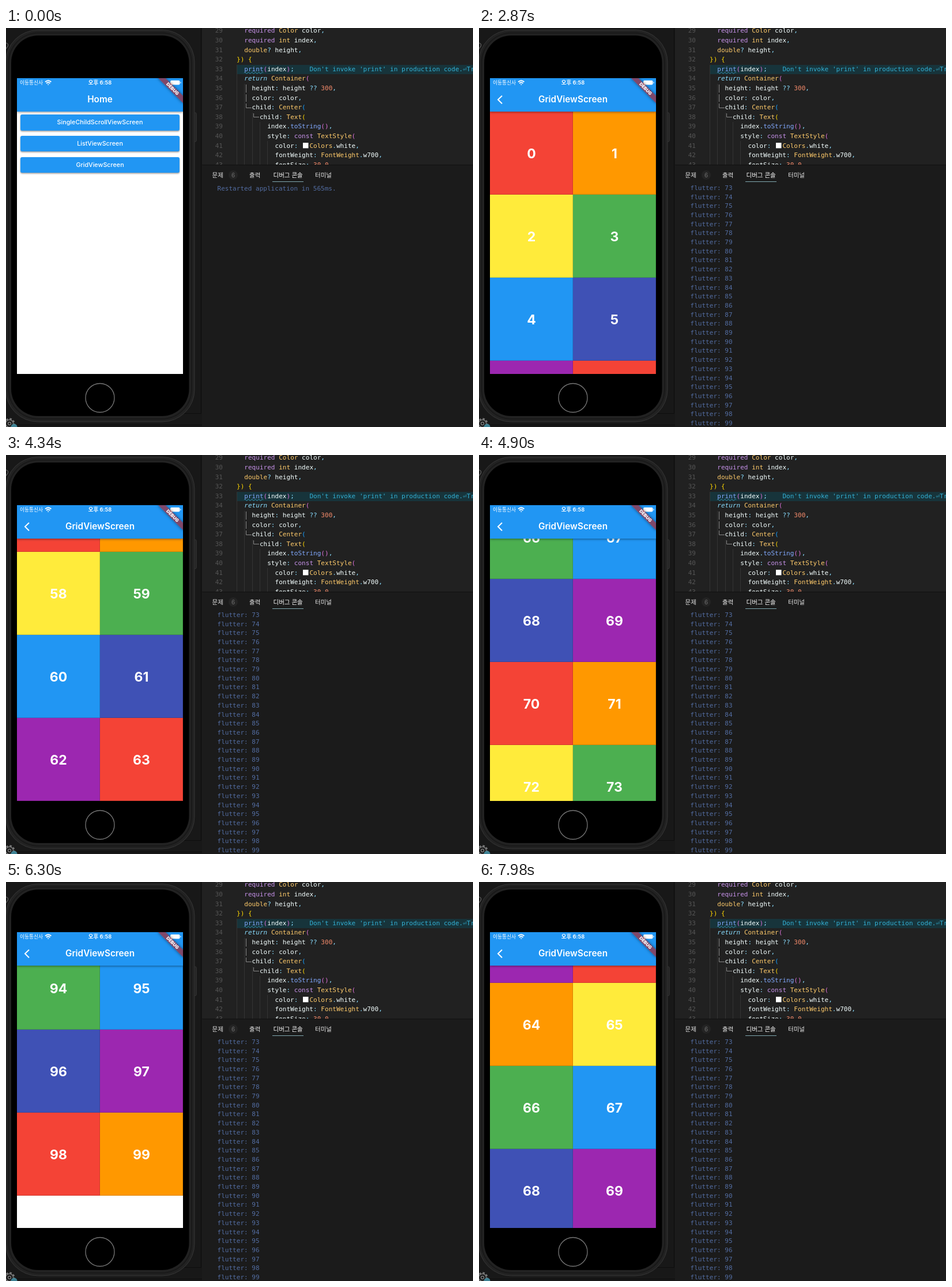
An HTML page for the animation above (8 s loop, 810 px wide and 692 px high).

```html
<!DOCTYPE html>
<html lang="ko">
<head>
<meta charset="utf-8">
<title>Grid scrolling</title>
<style>
html, body { margin: 0; width: 100%; height: 100%; overflow: hidden; background: #1a1a1a; }
#stage { position: absolute; left: 0; top: 0; width: 810px; height: 692px; overflow: hidden; }
#stage div, #stage pre, #stage svg { position: absolute; margin: 0; }

/* editor and debug console */
.editor { left: 340px; top: 0; width: 470px; height: 238px; background: #212121; overflow: hidden; }
.panel { left: 340px; top: 238px; width: 470px; height: 454px; background: #1b1b1b; box-shadow: 0 -1px #111; overflow: hidden; }
pre { font: 11.06px/16.6px "DejaVu Sans Mono", monospace; color: #f4ffff; white-space: pre; }
.code { left: 60px; top: -2.6px; }
.nums { left: 0; width: 36px; top: -2.6px; text-align: right; color: #555; }
.active { left: 60px; top: 63.5px; width: 410px; height: 16.6px; background: #17343b; }
.k { color: #c792ea; } .t { color: #ffcb6b; } .n { color: #f78c6c; } .f { color: #82aaff; }
.p { color: #89ddff; } .r { color: #89ddff; font-style: italic; } .hint { color: #33b0d4; }
.b1 { color: #ffd700; } .b2 { color: #da70d6; } .b3 { color: #179fff; }
.tab { top: 8px; font: 10.5px/18px "Noto Sans CJK KR", "Noto Sans CJK", sans-serif; color: #e8e8e8; white-space: nowrap; }
.badge { left: 46px; top: 9px; width: 16px; height: 16px; border-radius: 8px; background: #242424; color: #707070; font: 10px/16px Inter, sans-serif; text-align: center; }
.line { left: 122px; top: 28px; width: 54px; height: 1px; background: #80a8b0; }
.log { left: 26.5px; line-height: 15.7px; color: #536da2; }

/* phone screen */
.screen { left: 19px; top: 87px; width: 288px; height: 513px; overflow: hidden; background: #fff; font-family: Inter, sans-serif; color: #fff; }
.page { left: 0; top: 0; width: 288px; height: 513px; background: #fff; overflow: hidden; }
.bar { left: 0; top: 0; width: 288px; height: 58px; background: #2196f3; box-shadow: 0 1px 4px rgba(0,0,0,.45); }
.title { left: 0; top: 27px; width: 288px; font: 600 15.3px/20px Inter, sans-serif; text-align: center; }
.button { left: 6px; width: 276px; height: 27.6px; border-radius: 3px; background: #2196f3; box-shadow: 0 1.5px 2.5px rgba(0,0,0,.4); font: 500 10.75px/27.6px Inter, sans-serif; text-align: center; }
.cell { width: 144px; height: 144px; box-shadow: inset -1px -1px rgba(0,0,0,.14); font: 700 23px/146px Inter, sans-serif; text-align: center; }
#grid { left: 0; top: 58px; width: 288px; height: 7200px; }
#gridPage { box-shadow: 0 0 10px rgba(0,0,0,.3); }
.carrier { left: 5px; top: 1px; font: 500 8.7px/14px "Noto Sans CJK KR", "Noto Sans CJK", sans-serif; white-space: nowrap; }
.clock { left: 100px; width: 88px; top: 1px; text-align: center; font: 600 9.4px/14px Inter, "Noto Sans CJK KR", "Noto Sans CJK", sans-serif; }
.banner { left: 239px; top: 13.9px; width: 61.4px; height: 9.2px; transform: rotate(45deg); background: rgba(183,28,28,.63); box-shadow: 0 0 5px rgba(0,0,0,.5); font: 900 7.8px/9.4px Inter, sans-serif; text-align: center; }
</style>
</head>
<body>
<div id="stage">
  <div class="editor">
    <div class="active"></div>
    <svg width="470" height="238" fill="none">
      <path stroke="#343434" d="M60.5 64V238M73.5 97V238M87.5 147V238M100.5 163V238M113.5 196V238"/>
      <path stroke="#888" d="M76.5 98V112M76.5 115V128M76.5 131V138.500H86M89.500 148V154.500H99"/>
      <path stroke="#3794b5" d="M73 78q1.500-3 3 0t3 0 3 0 3 0 3 0 3 0 3 0 3 0 3 0 3 0 3 0"/>
      <rect x="175" y="199" width="9.500" height="9.500" fill="#fff"/>
    </svg>
    <pre class="nums" id="nums"></pre>
    <pre class="code">  <span class="k">required</span> <span class="t">Color</span> color<span class="p">,</span>
  <span class="k">required</span> <span class="t">int</span> index<span class="p">,</span>
  <span class="t">double</span><span class="p">?</span> height<span class="p">,</span>
<span class="b1">}) {</span>
  <span class="f">print</span><span class="b2">(</span>index<span class="b2">)</span><span class="p">;</span>    <span class="hint">Don't invoke 'print' in production code.⏎Try</span>
  <span class="r">return</span> <span class="t">Container</span><span class="b2">(</span>
    height<span class="p">:</span> height <span class="p">??</span> <span class="n">300</span><span class="p">,</span>
    color<span class="p">:</span> color<span class="p">,</span>
    child<span class="p">:</span> <span class="t">Center</span><span class="b3">(</span>
      child<span class="p">:</span> <span class="t">Text</span><span class="b1">(</span>
        index<span class="p">.</span><span class="f">toString</span><span class="b2">()</span><span class="p">,</span>
        style<span class="p">:</span> <span class="k">const</span> <span class="t">TextStyle</span><span class="b2">(</span>
          color<span class="p">:</span>   <span class="t">Colors</span><span class="p">.</span>white<span class="p">,</span>
          fontWeight<span class="p">:</span> <span class="t">FontWeight</span><span class="p">.</span>w700<span class="p">,</span>
          fontSize<span class="p">:</span> <span class="n">30.0</span><span class="p">,</span></pre>
  </div>
  <div class="panel">
    <div class="tab" style="left:17.500px">문제</div>
    <div class="badge">6</div>
    <div class="tab" style="left:82px">출력</div>
    <div class="tab" style="left:123.500px;color:#fff">디버그 콘솔</div>
    <div class="tab" style="left:196px">터미널</div>
    <div class="line"></div>
    <pre class="log" id="restart" style="top:32.800px">Restarted application in 565ms.</pre>
    <pre class="log" id="prints" style="top:31.800px"></pre>
  </div>

  <svg width="340" height="692" fill="none">
    <rect width="340" height="692" fill="#181818"/>
    <path stroke="#0d0d0d" d="M338.500 0V668.500H290M0 688.500H340"/>
    <path stroke="#555" stroke-width="1.500" d="M0 26q5 1 3 6l-3 4"/>
    <circle cx="6" cy="686" r="8" stroke="#777" stroke-width="3" stroke-dasharray="3.500 2.800"/>
    <circle cx="6" cy="686" r="6.500" stroke="#777" stroke-width="1.500"/>
    <circle cx="6" cy="686" r="2.500" stroke="#777" stroke-width="1.500"/>
    <circle cx="14" cy="692" r="5.500" fill="#3f8294"/>
    <rect x="326" y="147" width="4" height="50" rx="1.500" fill="#202020" stroke="#3c3c3c"/>
    <rect x="-.5" y="3.500" width="327.500" height="679.500" rx="56" fill="#222" stroke="#363636"/>
    <rect x="4.500" y="8.500" width="317.500" height="669.500" rx="52" stroke="#191919" stroke-width="2"/>
    <rect x="9" y="13" width="308.500" height="660" rx="47" fill="#000"/>
    <circle cx="163" cy="641.500" r="25" stroke="#777" stroke-width="1.300"/>
  </svg>

  <div class="screen">
    <div class="page" id="homePage">
      <div class="bar"><div class="title">Home</div></div>
      <div class="button" style="top:63px">SingleChildScrollViewScreen</div>
      <div class="button" style="top:99.900px">ListViewScreen</div>
      <div class="button" style="top:136.800px">GridViewScreen</div>
    </div>
    <div class="page" id="gridPage">
      <div id="grid"></div>
      <div class="bar">
        <svg width="40" height="58" fill="none"><path d="M21 30.500 14 37.300 21 44.200" stroke="#fff" stroke-width="2"/></svg>
        <div class="title">GridViewScreen</div>
      </div>
    </div>
    <div class="carrier">이동통신사</div>
    <svg width="288" height="20" fill="none" stroke="#fff" stroke-width="1.800">
      <path d="M49 6.500q5.200-4.600 10.400 0M51 9q3.200-2.900 6.400 0"/>
      <path d="M52.600 10.500h3.200l-1.600 1.800z" fill="#fff" stroke="none"/>
      <rect x="266" y="4" width="16.500" height="7.500" rx="2" fill="#fff" stroke="none"/>
      <path d="M284 6.500v2.500" stroke-width="1"/>
    </svg>
    <div class="clock">오후 6:58</div>
    <div class="banner">DEBUG</div>
  </div>
</div>

<script>
const $ = id => document.getElementById(id);
const LOOP = 8000, STEP = 70;
const CELL = 144, END = 6746;
const PUSH_START = 1700, PUSH_TIME = 400, PRINT_AT = 1820;
const EDGE_HIT = 6220, EDGE_SPEED = 2.1, REVERSE = 7100;
const COLORS = ["#f44336", "#ff9800", "#ffeb3b", "#4caf50", "#2196f3", "#3f51b5", "#9c27b0"];

// flings as [time, offset, speed in px/ms]
const DOWN = [
  [2870, 0, 0], [3000, 180, 2.6], [3570, 1683, 3.2], [4340, 4152.5, 2.2],
  [5000, 4860, .25], [5600, 4905, .03], [5670, 4920.5, 1], [5800, 5320, 4.7],
  [EDGE_HIT, END, EDGE_SPEED]
];
const UP = [[REVERSE, END, 0], [7250, 6400, -4], [7980, 4578, -1.2]];

$("nums").textContent = Array.from({ length: 15 }, (_, i) => i + 29).join("\n");
$("prints").textContent = Array.from({ length: 27 }, (_, i) => "flutter: " + (i + 73)).join("\n");

for (let i = 0; i < 100; i++) {
  const cell = document.createElement("div");
  cell.className = "cell";
  cell.textContent = i;
  cell.style.left = i % 2 * CELL + "px";
  cell.style.top = (i >> 1) * CELL + "px";
  cell.style.background = COLORS[i % COLORS.length];
  $("grid").append(cell);
}

// cubic Hermite curve through the points
function follow(points, t) {
  if (t <= points[0][0]) return points[0][1];
  const i = points.findIndex(p => p[0] >= t);
  if (i < 0) return points[points.length - 1][1];
  const [t0, y0, v0] = points[i - 1], [t1, y1, v1] = points[i];
  const d = t1 - t0, u = (t - t0) / d, w = 1 - u;
  return w * w * ((1 + 2 * u) * y0 + u * d * v0) + u * u * ((1 + 2 * w) * y1 - w * d * v1);
}

function scrollAt(t) {
  if (t < EDGE_HIT) return follow(DOWN, t);
  if (t >= REVERSE) return follow(UP, t);
  const dt = t - EDGE_HIT;
  return END + EDGE_SPEED * dt * Math.exp(-.014 * dt);
}

function draw(t) {
  const p = Math.min(1, Math.max(0, (t - PUSH_START) / PUSH_TIME));
  const pushed = t < 1750 ? 0 : 1 - (1 - p) ** 3.4;
  $("homePage").style.transform = `translateX(${-96 * pushed}px)`;
  $("gridPage").style.transform = `translateX(${288 * (1 - pushed)}px)`;
  $("gridPage").style.visibility = pushed ? "visible" : "hidden";
  $("grid").style.transform = `translateY(${-Math.round(scrollAt(t))}px)`;
  $("restart").style.visibility = t < PRINT_AT ? "visible" : "hidden";
  $("prints").style.visibility = t < PRINT_AT ? "hidden" : "visible";
}

const start = performance.now();
function tick() {
  const t = (performance.now() - start) % LOOP;
  draw(Math.floor(t / STEP) * STEP);
  requestAnimationFrame(tick);
}
tick();
</script>
</body>
</html>
```
